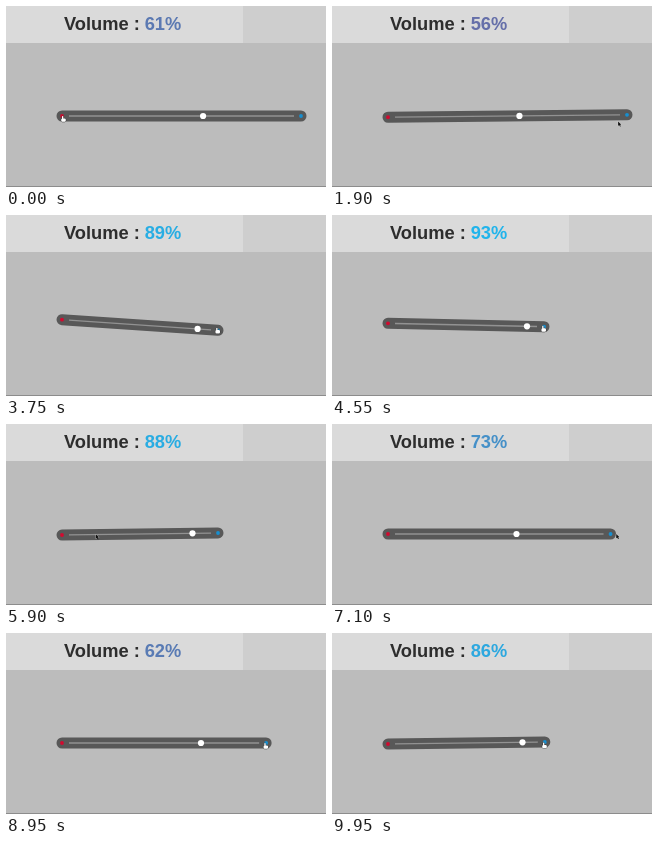
These frames come from a looping animation (320x181 px, 10000 ms). An HTML page with a canvas:

```html
<!DOCTYPE html>
<html lang="en">
<head>
<meta charset="utf-8">
<title>Volume slider</title>
<style>
  html, body { margin: 0; width: 100%; height: 100%; overflow: hidden; background: #bcbcbc; }
  canvas { display: block; width: 320px; height: 181px; }
</style>
</head>
<body>
<canvas id="stage"></canvas>
<script>
const W = 320, H = 181, LOOP = 10000, STEP = 50;
const LEFT = 56, MID_Y = 110, RADIUS = 5.5, INSET = 7;
const LONG = 295, SHORT = 212;
const COUNTER_LAG = 250;

const canvas = document.getElementById('stage');
const ctx = canvas.getContext('2d');
const ratio = window.devicePixelRatio || 1;
canvas.width = W * ratio;
canvas.height = H * ratio;
ctx.scale(ratio, ratio);

const progress = (t, from, to) => Math.min(1, Math.max(0, (t - from) / (to - from)));
const ease = (t, from, to) => {
  const u = progress(t, from, to);
  return u * u * (3 - 2 * u);
};
const easeOut = (t, from, to) => 1 - (1 - progress(t, from, to)) ** 2;

// The right handle is pushed in, pulled out and pushed in again
const rightEnd = t => LONG - (LONG - SHORT) *
  (ease(t, 2500, 3350) - ease(t, 6600, 7300) + easeOut(t, 8590, 10100));

// Half the height difference of the two ends, positive when the right one is lower
const tilt = t => -1.2 * ease(t, 50, 900) + 7.9 * ease(t, 2450, 3100)
  - 7.7 * ease(t, 3100, 5500) + 2 * ease(t, 6600, 7600) - 2 * ease(t, 8300, 9600);

// The knob rolls towards the lower end
const knobX = t => 199.4 - 12.2 * easeOut(t, -250, 2250) + 7.8 * ease(t, 3100, 4300)
  - 10.5 * ease(t, 4600, 6400) + 10.5 * ease(t, 7200, 8600) - 4.5 * ease(t, 9000, 9650);

// The pointer travels between the handles, leading the right one while it is pulled out
function pointer(t) {
  const reach = ease(t, 1400, 1960) - ease(t, 4700, 5250) + ease(t, 5600, 6600);
  const lead = 7 * (ease(t, 6600, 7100) - ease(t, 8400, 8800));
  const dip = 6 * (ease(t, 1400, 1900) - ease(t, 1950, 2450));
  return {
    x: LEFT + 0.5 + reach * (rightEnd(t) - LEFT - 1.8) + lead,
    y: MID_Y + tilt(t) * (reach - 0.5) + dip
  };
}

function line(x0, y0, x1, y1, width, color) {
  ctx.lineWidth = width;
  ctx.strokeStyle = color;
  ctx.beginPath();
  ctx.moveTo(x0, y0);
  ctx.lineTo(x1, y1);
  ctx.stroke();
}

function dot(x, y, radius, color) {
  ctx.fillStyle = color;
  ctx.beginPath();
  ctx.arc(x, y, radius, 0, 2 * Math.PI);
  ctx.fill();
}

function box(x, y, width, height, color) {
  ctx.fillStyle = color;
  ctx.fillRect(x, y, width, height);
}

function drawBackground() {
  box(0, 0, W, H, '#bcbcbc');
  box(0, 0, 237, 37, '#dadada');
  box(237, 0, W - 237, 37, '#cecece');
  box(0, 180, W, 1, '#8c8c8c');
}

function drawLabel(t) {
  const start = LEFT + INSET;
  const value = (knobX(t) - start) / (rightEnd(t) - INSET - start);
  const mix = (a, b) => Math.round(a + (b - a) * value);
  ctx.font = 'bold 18.3px "Liberation Sans", Arial, sans-serif';
  ctx.fillStyle = '#2d2d2d';
  ctx.fillText('Volume :', 58, 24.4);
  ctx.fillStyle = `rgb(${mix(201, 20)}, ${mix(9, 193)}, ${mix(71, 247)})`;
  ctx.fillText(Math.round(value * 100) + '%', 138.7, 24.4);
}

function drawSlider(t) {
  const right = rightEnd(t), knob = knobX(t), lean = tilt(t);
  const yAt = x => MID_Y + lean * (2 * (x - LEFT) / (right - LEFT) - 1);
  ctx.lineCap = 'round';
  line(LEFT, yAt(LEFT), right, yAt(right), RADIUS * 2, '#585858');
  ctx.lineCap = 'butt';
  const from = LEFT + INSET, to = right - INSET;
  line(from, yAt(from), to, yAt(to), 1.4, '#929292');
  dot(LEFT, yAt(LEFT), 1.9, '#d3092f');
  dot(right, yAt(right), 1.9, '#168fd0');
  dot(knob, yAt(knob), 3.1, '#fff');
}

function drawHand(x, y) {
  ctx.beginPath();
  ctx.roundRect(x - 0.5, y, 1.3, 4, 0.6);
  ctx.roundRect(x - 1.3, y + 2.4, 4.6, 3.4, 1.2);
  ctx.lineWidth = 0.8;
  ctx.strokeStyle = '#333';
  ctx.stroke();
  ctx.fillStyle = '#fff';
  ctx.fill();
}

function drawArrow(x, y) {
  ctx.beginPath();
  ctx.moveTo(x, y);
  ctx.lineTo(x, y + 4.2);
  ctx.lineTo(x + 3, y + 3);
  ctx.closePath();
  ctx.lineWidth = 0.6;
  ctx.strokeStyle = '#ddd';
  ctx.stroke();
  ctx.fillStyle = '#111';
  ctx.fill();
  line(x + 1.2, y + 2.8, x + 2.2, y + 5, 0.9, '#111');
}

function drawPointer(t) {
  const { x, y } = pointer(t), lean = tilt(t);
  const over = (hx, hy) => Math.hypot(hx - x, hy - y) < 3.4;
  const hovering = over(LEFT, MID_Y - lean) || over(rightEnd(t), MID_Y + lean);
  (hovering ? drawHand : drawArrow)(x, y);
}

function render(now) {
  const t = Math.floor(now % LOOP / STEP) * STEP;
  drawBackground();
  drawLabel(t - COUNTER_LAG);
  drawSlider(t);
  drawPointer(t);
}

const begin = performance.now();
function tick() {
  render(performance.now() - begin);
  requestAnimationFrame(tick);
}
tick();
</script>
</body>
</html>
```
